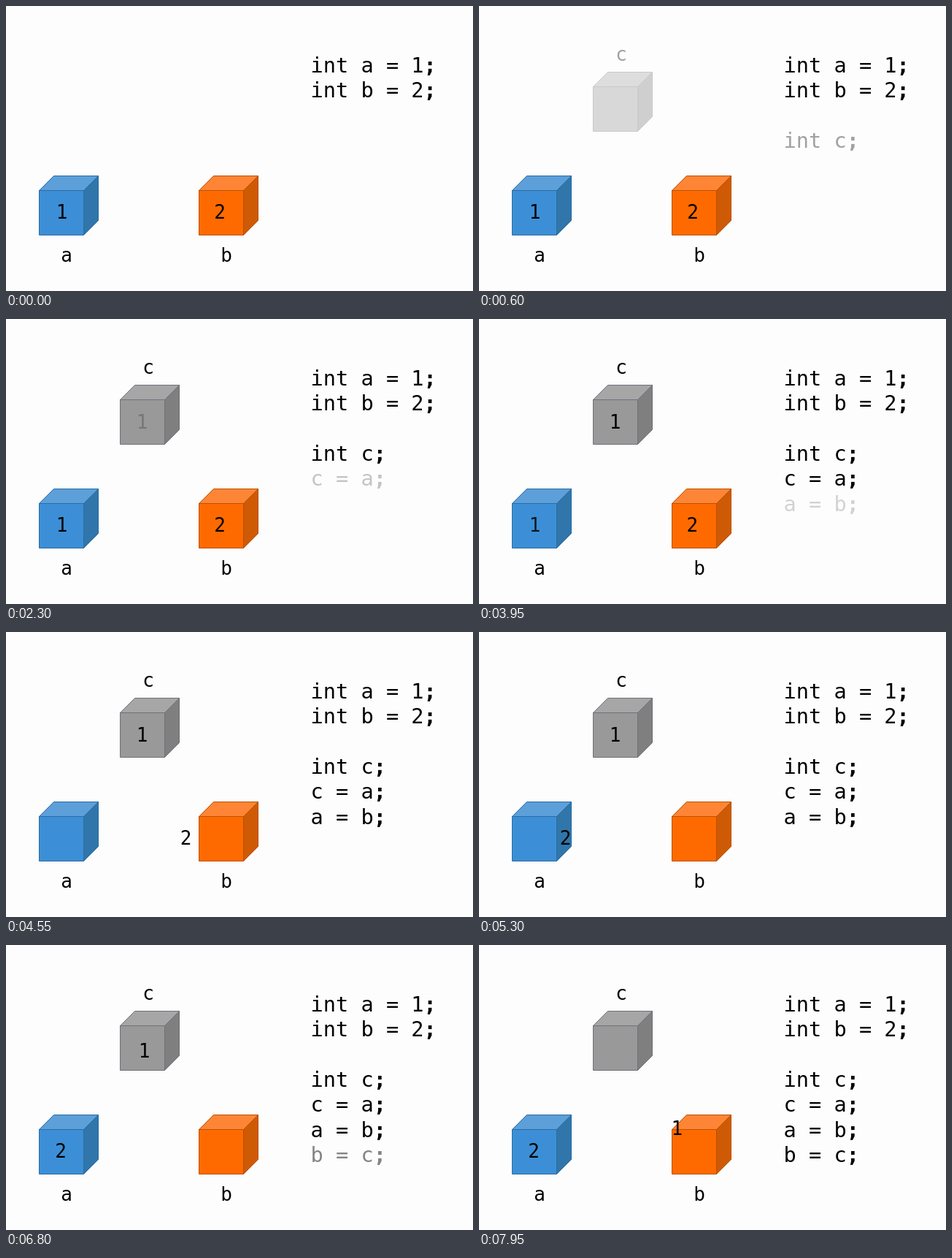
An HTML page that plays this animation: 640 px wide and 390 px high, repeating every 8000 ms.

```html
<!DOCTYPE html>
<html lang="en">
<head>
<meta charset="utf-8">
<title>Swapping two variables</title>
<style>
  html, body { margin: 0; width: 100%; height: 100%; overflow: hidden; background: #fdfdfd; }
  svg { display: block; width: 100%; height: 100%; }
  text { font: 26px "DejaVu Sans Mono", monospace; fill: #000; text-anchor: middle; white-space: pre; }
  .code { font-size: 28.6px; text-anchor: start; }
  .end { font-weight: bold; }
  polygon { stroke-width: 1; stroke-linejoin: round; }
</style>
</head>
<body>
<svg id="stage" viewBox="0 0 640 390"></svg>
<script>
const LOOP = 8000, FRAME = 50, FADE = 525, MOVE = 2100;
const STEP = { declareC: 410, copyA: 2185, copyB: 3864, copyC: 6550 };

const stage = document.getElementById('stage');

function add(tag, attrs, content = '', parent = stage) {
  const node = document.createElementNS('http://www.w3.org/2000/svg', tag);
  for (const key in attrs) node.setAttribute(key, attrs[key]);
  node.textContent = content;
  return parent.appendChild(node);
}

// A cube whose front face has its top left corner at x, y.
function cube(x, y, front, top, side, stroke) {
  const size = 61, depth = 20, group = add('g', {});
  const face = (fill, ...points) => add('polygon', {
    fill, stroke, points: points.map(([dx, dy]) => [x + dx, y + dy]).join(' ')
  }, '', group);
  face(front, [0, 0], [size, 0], [size, size], [0, size]);
  face(top, [0, 0], [depth, -depth], [size + depth, -depth], [size, 0]);
  face(side, [size, 0], [size + depth, -depth], [size + depth, size - depth], [size, size]);
  return group;
}

const label = (text, x, y) => add('text', { x, y }, text);

// A line of code, closed by a bold semicolon.
function code(text, row) {
  const line = add('text', { class: 'code', x: 417.6, y: 90.5 + 34.4 * row }, text);
  add('tspan', { class: 'end' }, ';', line);
  return line;
}

cube(45.5, 252.5, '#3c8fd6', '#5c9fd9', '#3076ab', '#2c6ca3');
cube(264.5, 252.5, '#ff6a00', '#ff8536', '#cf5a06', '#b85200');
const cubeC = cube(156.5, 110.5, '#999999', '#a6a6a6', '#7f7f7f', '#70707c');

label('a', 83, 349.5);
label('b', 302, 349.5);
const labelC = label('c', 195, 74.5);

code('int a = 1', 0);
code('int b = 2', 1);
const lineC = code('int c', 3);
const lineCA = code('c = a', 4);
const lineAB = code('a = b', 5);
const lineBC = code('b = c', 6);

const oneInA = label('1', 76.5, 291.3);
const oneInC = label('1', 186.6, 150);
const two = label('2', 293, 291.3);

const progress = (time, start, duration) => Math.min(1, Math.max(0, (time - start) / duration));
const ease = p => p < 0.5 ? 2 * p * p : 1 - 2 * (1 - p) ** 2;

function fadeIn(nodes, time, start) {
  for (const node of nodes) node.setAttribute('opacity', progress(time, start, FADE));
}

function move(node, dx, dy, time, start) {
  const p = ease(progress(time, start, MOVE));
  node.setAttribute('transform', `translate(${dx * p} ${dy * p})`);
}

function draw(time) {
  fadeIn([cubeC, labelC, lineC], time, STEP.declareC);
  fadeIn([lineCA, oneInC], time, STEP.copyA);
  fadeIn([lineAB], time, STEP.copyB);
  fadeIn([lineBC], time, STEP.copyC);
  oneInA.setAttribute('opacity', 1 - progress(time, STEP.copyB, FADE));
  move(two, -218, 0, time, STEP.copyB);
  move(oneInC, 109, 141, time, STEP.copyC);
}

const begin = performance.now();
function tick() {
  const time = (performance.now() - begin) % LOOP;
  draw(Math.floor(time / FRAME) * FRAME);
  requestAnimationFrame(tick);
}
tick();
</script>
</body>
</html>
```
